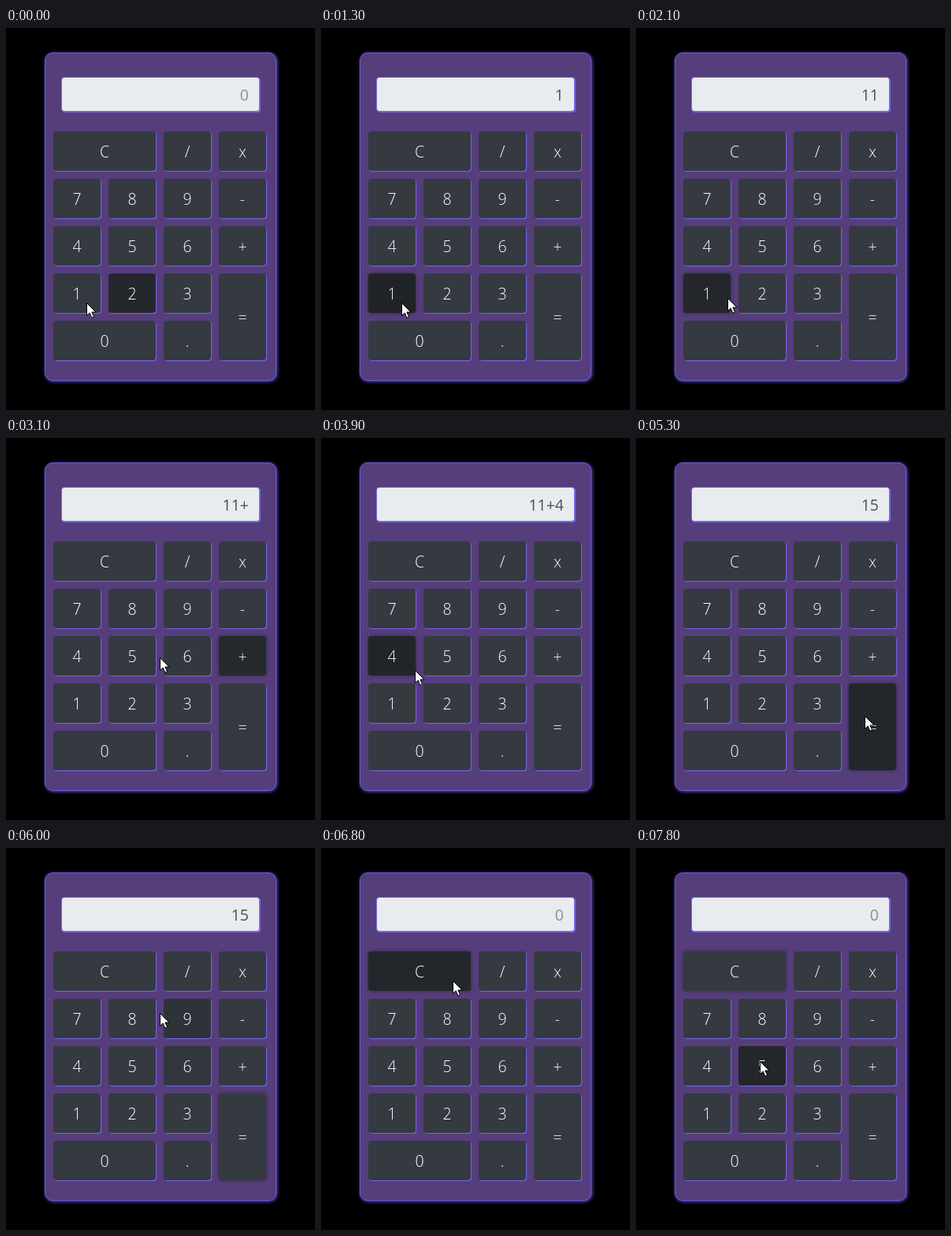
Animation, 392 px wide and 484 px high, one loop 8 s. Source, as an HTML page:

```html
<!DOCTYPE html>
<html lang="en">
<head>
<meta charset="utf-8">
<title>Calculator</title>
<style>
html, body { margin: 0; width: 100%; height: 100%; overflow: hidden; background: #000; }
body { position: relative; font: 19.5px "Open Sans", "Noto Sans", sans-serif; }
div, svg { position: absolute; box-sizing: border-box; }
#card {
  left: 49px; top: 31px; width: 294px; height: 416px;
  border: 1px solid #6a5ad8; border-radius: 10px;
  background: #563d7c; box-shadow: 1px 1px 4px #6454d4;
}
#display {
  left: 70px; top: 62px; width: 252px; height: 44px;
  padding-right: 13px; border: 1px solid #7566e2; border-radius: 4px;
  background: #e9ecef; box-shadow: 1px 1px 1px #7b68ee;
  line-height: 44px; text-align: right;
}
.key {
  display: flex; align-items: center; justify-content: center;
  border-radius: 4px; color: #fff; font-weight: 300;
}
#cursor { left: 0; top: 0; overflow: visible; }
</style>
</head>
<body>
<div id="card"></div>
<div id="display"></div>
<svg id="cursor" width="13" height="21">
  <path d="M.5 .5V16.5L4.2 13 6.8 19.2 9.5 18 6.9 12H12Z" fill="#fff" stroke="#000"/>
</svg>
<script>
const LOOP = 8000, FADE = 150, STEPS = 15, HOLD = 200, PITCH = 60, GAP = 10;
const display = document.getElementById('display');
const cursor = document.getElementById('cursor');

// A label repeated across cells makes one larger key.
const rows = ['CC/x', '789-', '456+', '123=', '00.='];
const keys = [...new Set(rows.join(''))].map(label => {
  const top = rows.findIndex(r => r.includes(label));
  const left = rows[top].indexOf(label);
  const across = rows[top].split(label).length - 1;
  const down = rows.filter(r => r.includes(label)).length;
  const key = {
    label,
    x: 60 + left * (PITCH + GAP), w: across * (PITCH + GAP) - GAP,
    y: 131 + top * PITCH, h: down * PITCH - GAP
  };
  key.el = document.createElement('div');
  key.el.className = 'key';
  key.el.textContent = label;
  key.el.style.cssText =
    `left:${key.x}px;top:${key.y}px;width:${key.w}px;height:${key.h}px`;
  document.body.insertBefore(key.el, cursor);
  return key;
});

// The pointer rests at each stop, then glides to the next.
const home = [150, 348];
const moves = [
  { start: -30, time: 30, to: [102, 348] },
  { start: 2000, time: 600, to: [282, 265] },
  { start: 3040, time: 120, to: [112, 291] },
  { start: 3840, time: 500, to: [290, 352] },
  { start: 5550, time: 650, to: [167, 168] },
  { start: 7200, time: 300, to: [157, 270] }
];
const presses = [
  [1000, '1'], [1250, '1'], [2800, '+'], [3620, '4'], [4700, '='], [6400, 'C']
];

const ease = k => k * k * (3 - 2 * k);
const mix = (a, b, k) => a.map((v, i) => v + (b[i] - v) * k);
const rgb = c => `rgb(${c.map(Math.round)})`;

const pointer = t => moves.reduce((at, { start, time, to }) =>
  mix(at, to, ease(Math.min(1, Math.max(0, (t - start) / time)))), home);

const hovered = (key, [x, y]) =>
  x >= key.x && x < key.x + key.w && y >= key.y && y < key.y + key.h;
const pressed = (key, t) =>
  presses.some(([at, label]) => label === key.label && t >= at && t < at + HOLD);
const focused = (key, t) =>
  presses.filter(([at]) => at <= t).pop()?.[1] === key.label;

function calculate(text, label) {
  if (label === 'C') return '';
  if (label === '=') return String(text.split('+').reduce((sum, n) => sum + Number(n), 0));
  return text + label;
}

const NORMAL = [52, 58, 64], HOVER = [35, 39, 43], ACTIVE = [29, 33, 36];
const EDGE = [123, 104, 238], RING = [46, 44, 58];

function draw(t) {
  // Averaging the recent past fades each state over FADE ms.
  const times = Array.from({ length: STEPS }, (_, i) => t - i * FADE / STEPS);
  const points = times.map(pointer);
  const level = test => ease(times.filter(test).length / STEPS);

  for (const key of keys) {
    const hover = level((_, i) => hovered(key, points[i]));
    const press = level(s => pressed(key, s));
    const focus = level(s => focused(key, s));
    const offset = 1 - focus;
    key.el.style.background = rgb(mix(mix(NORMAL, HOVER, hover), ACTIVE, press));
    key.el.style.boxShadow =
      `${offset}px ${offset}px ${1 + 3 * focus}px ${rgb(mix(EDGE, RING, focus))}`;
  }

  const text = presses.filter(([at]) => at + HOLD <= t)
    .reduce((shown, [, label]) => calculate(shown, label), '');
  display.textContent = text || '0';
  display.style.color = text ? '#495057' : '#868e94';

  const [x, y] = points[0].map(Math.round);
  cursor.style.transform = `translate(${x}px,${y}px)`;
}

function frame() {
  draw(performance.now() % LOOP);
  requestAnimationFrame(frame);
}
frame();
</script>
</body>
</html>
```
